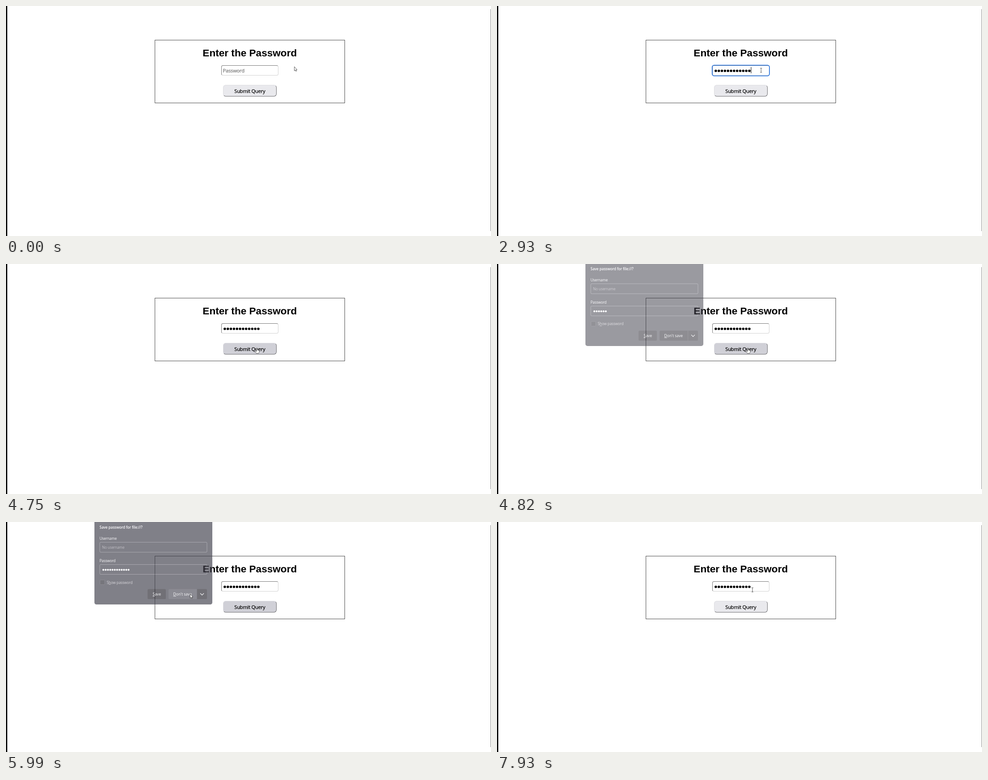
An HTML page that plays this animation: 1086 by 516 pixels, repeating every 8000 ms.

```html
<!DOCTYPE html>
<html lang="en">
<head>
<meta charset="utf-8">
<title>Enter the Password</title>
<style>
  html, body { margin: 0; width: 100%; height: 100%; overflow: hidden; background: #fff; }
  svg, .input, .button { position: absolute; box-sizing: border-box; }
  svg { left: 0; top: 0; }
  .input {
    left: 482px; top: 133px; width: 128px; height: 23px;
    border: 1px solid; border-color: #767676 #d2d2d2 #d2d2d2 #767676;
    border-radius: 4px;
  }
  .button {
    left: 486px; top: 177px; width: 120px; height: 26px;
    border: 1px solid; border-color: #dcdce0 #6c6c70 #6c6c70 #dcdce0;
    border-radius: 6px; background: #e9e9ed;
  }
  .button.hover { background: #d0d0d7; }
  .button.active { background: #b1b1b9; }
  text { font-family: "Open Sans", "Noto Sans", sans-serif; }
  .heading { font: bold 22.6px "Liberation Sans", Arial, sans-serif; }
  .field {
    font-size: 11.2px; letter-spacing: -.25px;
    fill: currentColor; stroke: currentColor; stroke-width: .25;
  }
  #hint { color: #757575; }
  .panel text { font-size: 8.2px; letter-spacing: -.15px; fill: #fbfbfe; }
  .panel .title { font-weight: 600; letter-spacing: -.1px; }
  .panel .label { font-size: 8.5px; letter-spacing: 0; }
  .panel .dim { fill: #a3a2ab; }
  .panel .soft { fill: #c3c2c9; }
  .key { text-decoration: underline; }
  .box { fill: none; stroke: #8a8994; stroke-width: .9; }
  .dark { fill: #2b2a33; }
  .dark.hover { fill: #52525e; }
</style>
</head>
<body>
<div class="input"></div>
<div class="button" id="button"></div>
<svg width="1086" height="516" viewBox="0 0 1086 516">
  <rect width="2.8" height="516"/>
  <rect x="1085" y="7" width="1" height="498" fill="#8c8c8c"/>
  <rect x="333.5" y="76.5" width="425" height="141" fill="none" stroke="#484848"/>
  <text class="heading" x="545.8" y="112.6" text-anchor="middle">Enter the Password</text>
  <rect id="ring" x="481.8" y="132.8" width="128.3" height="24" rx="4.5" fill="none" stroke="#1f6fe0" stroke-width="1.6"/>
  <text class="field" id="hint" x="485.5" y="149">Password</text>
  <g id="dots"></g>
  <rect id="caret" y="137" width="1" height="14"/>
  <text class="field" x="545.8" y="194.5" text-anchor="middle">Submit Query</text>

  <g class="panel" id="panel">
    <rect x="198" y="-90" width="264" height="275" rx="4.5" fill="#42414d"/>
    <text class="title" x="209.5" y="14.7">Save password for file://?</text>
    <text x="209.5" y="40">Username</text>
    <rect class="box" x="210" y="45.4" width="240" height="22.4" rx="2"/>
    <text class="dim" x="215" y="60">No username</text>
    <text x="209.5" y="90">Password</text>
    <rect class="box" x="210" y="95.4" width="240" height="22" rx="2"/>
    <g id="panelDots" fill="#fbfbfe"></g>
    <rect x="210.5" y="130" width="10.5" height="10.5" rx="1" fill="#33323c" stroke="#5c5b66" stroke-width=".8"/>
    <text class="soft" x="225.5" y="138.5">S<tspan class="key">h</tspan>ow password</text>
    <rect class="dark" x="317" y="150.5" width="41" height="22.5" rx="2.5"/>
    <text class="label" x="337.7" y="165" text-anchor="middle"><tspan class="key">S</tspan>ave</text>
    <path class="dark" id="decline" d="M366.5 150.5H427V173H366.5a2.5 2.5 0 0 1-2.5-2.5V153a2.5 2.5 0 0 1 2.5-2.5Z"/>
    <path class="dark" d="M428 150.5H447.5a2.5 2.5 0 0 1 2.5 2.5V170.5a2.5 2.5 0 0 1-2.5 2.5H428Z"/>
    <text class="label" x="395.3" y="165" text-anchor="middle"><tspan class="key">D</tspan>on't save</text>
    <path d="M435 160l4 4 4-4" fill="none" stroke="#fbfbfe" stroke-width="1.1"/>
  </g>

  <g id="cursor" stroke-linejoin="round">
    <path id="arrow" d="M.4 .4V9.7L2.5 7.9 3.9 10.8 5.2 10.2 3.9 7.3H6.6Z" fill="#fff" stroke="#333" stroke-width=".8"/>
    <path id="beam" d="M-2-4.5H-.5Q0-4.5 0-4 0-4.5 .5-4.5H2M0-4V4.5M-2 5H-.5Q0 5 0 4.5 0 5 .5 5H2" fill="none" stroke="#444" stroke-width=".9"/>
    <path id="hand" d="M-1.2 0Q0-1.2 .8 0V4L3.6 4.6Q5 5 5 6.2V8.6L3.8 11.5H-1.4L-4 7.2Q-3.8 5.8-2.6 6.4L-1.2 7.6Z" fill="#fff" stroke="#444" stroke-width=".8"/>
  </g>
</svg>
<script>
const LOOP = 8000;
const $ = id => document.getElementById(id);
const keys = [1790, 1930, 2000, 2070, 2130, 2270, 2340, 2540, 2620, 2690, 2760, 2830];
const blinks = [[1000, 1530], [1790, 3120], [3650, 4220]];
const PITCH = 6.83;

// Each glide: start, time per step, number of steps, end point.
const home = [645.3, 135.8];
const glides = [
  [70, 67, 5, [591.3, 144]],
  [3650, 71, 7, [562, 189]],
  [5300, 63, 4, [465, 181.5]],
  [5560, 66, 4, [412, 161]],
  [6970, 70, 1, [416.8, 160]],
  [7040, 69, 11, [554.3, 152]],
  [7800, 65, 3, [572, 152]]
];

const within = (t, a, b) => t >= a && t < b;
const show = (el, on) => el.style.display = on ? "" : "none";
const smooth = p => (1 - Math.cos(Math.PI * p)) / 2;
const steps = (t, start, gap, n) =>
  Math.max(0, Math.min(n, Math.floor((t - start) / gap) + 1)) / n;

function addDots(group, x, y, pitch, r) {
  return keys.map((_, i) => {
    const dot = document.createElementNS("http://www.w3.org/2000/svg", "circle");
    dot.setAttribute("cx", x + i * pitch);
    dot.setAttribute("cy", y);
    dot.setAttribute("r", r);
    return group.appendChild(dot);
  });
}
const dots = addDots($("dots"), 489.9, 145.6, PITCH, 2.75);
const panelDots = addDots($("panelDots"), 218, 107.3, 5.13, 2.1);

function pointer(t) {
  let pos = home;
  for (const [start, gap, n, to] of glides) {
    if (t < start) break;
    const p = smooth(steps(t, start, gap, n));
    pos = pos.map((v, i) => v + (to[i] - v) * p);
  }
  return pos;
}

function drawCursor(t) {
  const [x, y] = pointer(t);
  const overInput = within(x, 482, 610) && within(y, 133, 156);
  const overButton = within(x, 486, 606) && within(y, 178, 203);
  show($("beam"), overInput);
  show($("hand"), overButton);
  show($("arrow"), !overInput && !overButton);
  $("cursor").setAttribute("transform", `translate(${x} ${y})`);
  return overButton;
}

function drawPanel(t) {
  const open = steps(t, 4820, 70, 2);
  const close = steps(t, 5950, 70, 3);
  const rise = -70 * (1 - open) ** 6;
  const panel = $("panel");
  show(panel, open > 0 && close < 1);
  panel.setAttribute("opacity", (open < 1 ? .53 : 1) * (1 - close));
  panel.setAttribute("transform", `translate(0 ${rise})`);
  panelDots.forEach((dot, i) => show(dot, i < 6 || t >= 4890));
  $("decline").classList.toggle("hover", t >= 5690);
}

function draw(t) {
  const typed = keys.filter(k => t >= k).length;
  dots.forEach((dot, i) => show(dot, i < typed));
  show($("hint"), !typed);
  show($("caret"), blinks.some(([a, b]) => within(t, a, b)));
  $("caret").setAttribute("x", typed ? 486.5 + typed * PITCH : 486);
  show($("ring"), within(t, 920, 4690));

  const over = drawCursor(t);
  $("button").classList.toggle("hover", over || within(t, 4620, 6020));
  $("button").classList.toggle("active", within(t, 4620, 4750));
  drawPanel(t);
}

const began = performance.now();
function tick() {
  draw((performance.now() - began) % LOOP);
  requestAnimationFrame(tick);
}
tick();
</script>
</body>
</html>
```
